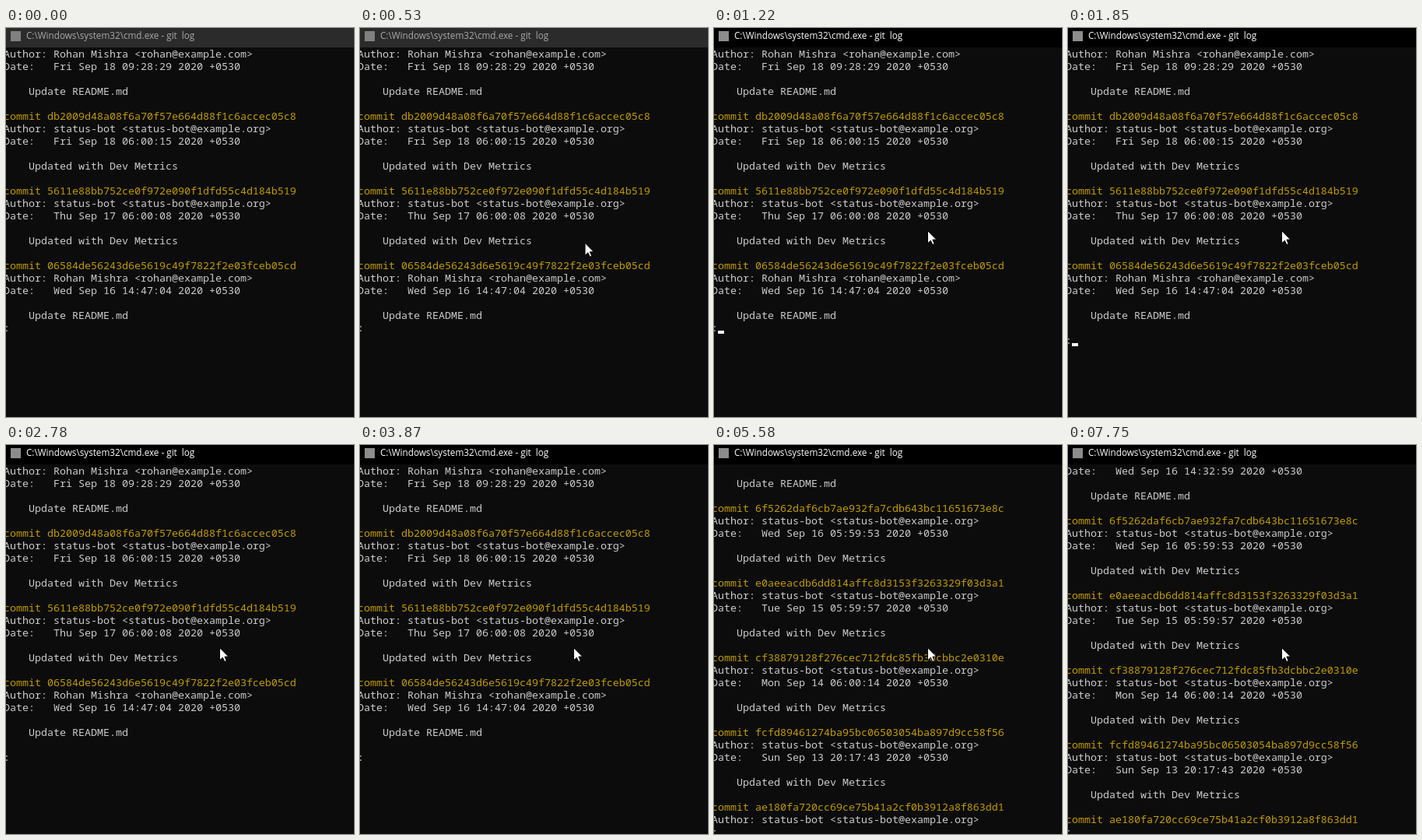
An HTML page with a canvas for the animation above (8000 ms loop, 447 by 500 pixels).

```html
<!DOCTYPE html>
<html lang="en">
<head>
<meta charset="utf-8">
<title>git log</title>
<style>
html, body { margin: 0; width: 100%; height: 100%; overflow: hidden; background: #0c0c0c; }
canvas { display: block; }
</style>
</head>
<body>
<canvas id="stage" width="447" height="500"></canvas>
<script>
const ctx = document.getElementById('stage').getContext('2d');
const LOOP = 8000, LEFT = -3, TOP = 25, ROW = 16, COL = 8, ROWS = 30;
const GREY = '#cccccc', GOLD = '#c19c00';

const person = ['Rohan Mishra <rohan@example.com>', 'Update README.md'];
const bot = ['status-bot <status-bot@example.org>', 'Updated with Dev Metrics'];
const commits = [
  ['', person, 'Fri Sep 18 09:28:29'],
  ['db2009d48a08f6a70f57e664d88f1c6accec05c8', bot, 'Fri Sep 18 06:00:15'],
  ['5611e88bb752ce0f972e090f1dfd55c4d184b519', bot, 'Thu Sep 17 06:00:08'],
  ['06584de56243d6e5619c49f7822f2e03fceb05cd', person, 'Wed Sep 16 14:47:04'],
  ['4dc5daa5f9473de0e2f95fc5ecc30508e5e1213a', person, 'Wed Sep 16 14:45:17'],
  ['91c75eba83cf9cb2a809417fc5878791e36a5185', person, 'Wed Sep 16 14:36:05'],
  ['4819842335d9b3e5d7ed77e1cd29816b586affb3', person, 'Wed Sep 16 14:32:59'],
  ['6f5262daf6cb7ae932fa7cdb643bc11651673e8c', bot, 'Wed Sep 16 05:59:53'],
  ['e0aeeacdb6dd814affc8d3153f3263329f03d3a1', bot, 'Tue Sep 15 05:59:57'],
  ['cf38879128f276cec712fdc85fb3dcbbc2e0310e', bot, 'Mon Sep 14 06:00:14'],
  ['fcfd89461274ba95bc06503054ba897d9cc58f56', bot, 'Sun Sep 13 20:17:43'],
  ['ae180fa720cc69ce75b41a2cf0b3912a8f863dd1', bot, 'Sun Sep 13 06:00:11']
];
const log = commits.flatMap(([hash, [author, note], date]) => [
  'commit ' + hash, 'Author: ' + author, `Date:   ${date} 2020 +0530`, '', '    ' + note, ''
]);

// [start, first log line, prompt row, cursor shown]
const states = [
  [0, 1, 22, false], [1220, 1, 22, true], [1770, 1, 22, false],
  [1850, 1, 23, true], [2780, 1, 23, false], [3320, 1, 23, true], [3870, 1, 23, false],
  [4020, 10, 29, false], [5580, 39, 29, false], [7750, 38, 29, false]
];

function rect(color, x, y, w, h) {
  ctx.fillStyle = color;
  ctx.fillRect(x, y, w, h);
}

function text(s, x, y, color, font) {
  ctx.font = font;
  ctx.fillStyle = color;
  ctx.fillText(s, x, y);
}

function drawTerminal(t) {
  const [, first, prompt, cursor] = states.findLast(s => t >= s[0]);
  for (let r = 0; r < ROWS && r <= prompt; r++) {
    const line = r === prompt ? ':' : log[first + r];
    const color = line.startsWith('commit') ? GOLD : GREY;
    text(line, LEFT, TOP + r * ROW + 13, color, '13.3333px "Noto Sans Mono", monospace');
  }
  if (cursor) rect('#f2f2f2', LEFT + COL, TOP + (prompt + 1) * ROW - 4, COL, 4);
}

function drawTitle(active) {
  rect(active ? '#000000' : '#2b2b2b', 0, 0, 447, TOP);
  rect(active ? '#8c8c8c' : '#808080', 6, 4, 13, 13);
  text('C:\\Windows\\system32\\cmd.exe - git  log', 26, 14,
    active ? '#ffffff' : '#aaaaaa', '11.7px "Open Sans", sans-serif');
}

const arrow = new Path2D('M.5 .7V16.8L4.3 13.2L6.8 18.5L9.2 17.5L6.9 12.1H11.8Z');

function drawPointer(t) {
  if (t < 70) return;
  // the pointer moves in steps of about 77 ms
  const step = Math.min(1, Math.floor((t - 70) / 77 + 1) / 8);
  const far = (1 - step) ** 2;
  const x = t < 920 ? 276 + 200 * far : 274, y = 260 + 250 * far;
  if (t >= 610 && t < 840) {
    ctx.fillStyle = '#807a04';
    ctx.beginPath();
    ctx.arc(277, 261, 12, 0, 7);
    ctx.fill();
  }
  ctx.save();
  ctx.translate(x, y);
  ctx.fillStyle = '#ffffff';
  ctx.strokeStyle = '#000000';
  ctx.fill(arrow);
  ctx.stroke(arrow);
  ctx.restore();
}

function frame(now) {
  const t = now % LOOP;
  rect('#0c0c0c', 0, 0, 447, 500);
  drawTerminal(t);
  drawTitle(t >= 610);
  drawPointer(t);
  requestAnimationFrame(frame);
}
requestAnimationFrame(frame);
</script>
</body>
</html>
```
